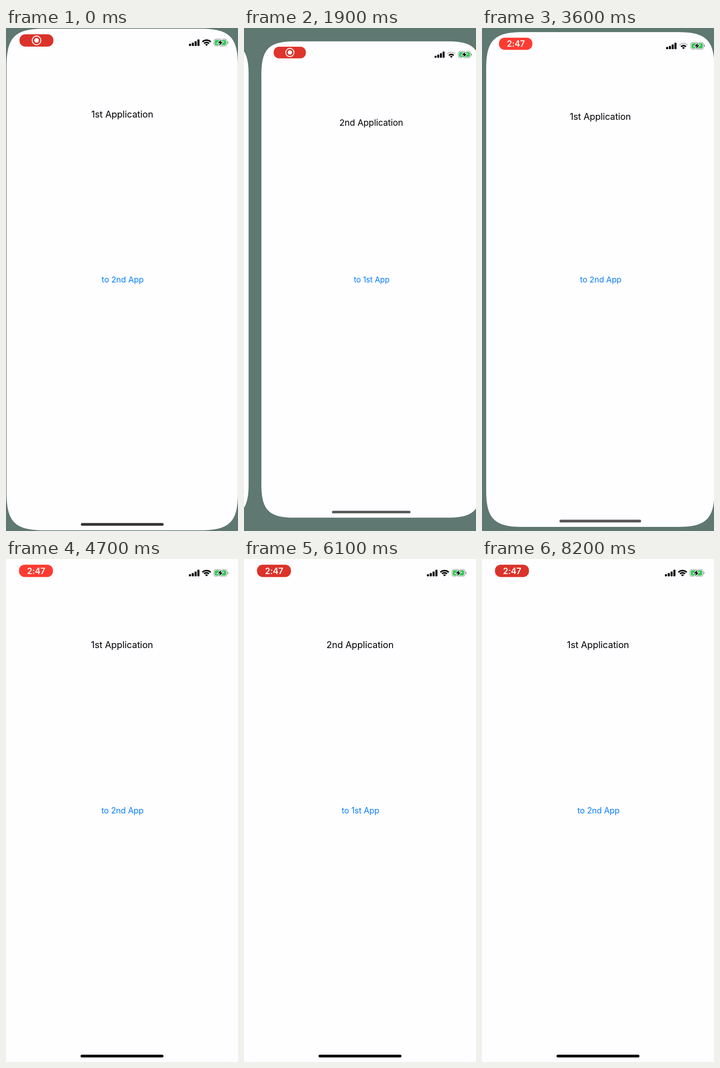
These frames come from a looping animation (509 by 1101 pixels, 8.3 s). An HTML page with a canvas:

```html
<!DOCTYPE html>
<html lang="en">
<head>
<meta charset="utf-8">
<title>Switching between two apps</title>
<style>
html, body { margin: 0; width: 100%; height: 100%; overflow: hidden; background: #5f7871; }
canvas { display: block; }
</style>
</head>
<body>
<canvas id="stage" width="509" height="1101"></canvas>
<script>
const W = 509, H = 1101, GAP = 29.6, LOOP = 8300, STEP = 100;
const ctx = document.getElementById('stage').getContext('2d');
const FONT = 'Inter, "Liberation Sans", sans-serif';
const APPS = [
  { title: '1st Application', link: 'to 2nd App' },
  { title: '2nd Application', link: 'to 1st App' }
];
// Start of each switch in ms; the apps alternate, and the first one is just ending at load.
const SWITCHES = [-650, 1563, 3128.7, 5152, 6633];
const PRESS_LEAD = 200;

// Slide of the incoming card (1 = next slot, 0 = in place) and shrink of the whole deck.
const slide = s => (1 + 14.2 * s) * Math.exp(-14.2 * s);
const shrink = s => 35.9 * s ** 1.84 * Math.exp(-13.4 * s);

function text(str, x, y, size, color, weight = 400) {
  ctx.font = `${weight} ${size}px ${FONT}`;
  ctx.letterSpacing = -0.006 * size + 'px';
  ctx.textAlign = 'center';
  ctx.fillStyle = color;
  ctx.fillText(str, x, y);
}

function box(x, y, w, h, r, color) {
  ctx.beginPath();
  ctx.roundRect(x, y, w, h, r);
  ctx.fillStyle = color;
  ctx.fill();
}

function circle(x, y, r) {
  ctx.beginPath();
  ctx.arc(x, y, r, 0, 2 * Math.PI);
}

// Card outline with smooth continuous corners.
function cardPath(x, y, w, h, r) {
  const k = r * 0.23, right = x + w, low = y + h;
  ctx.beginPath();
  ctx.moveTo(x, y + r);
  ctx.bezierCurveTo(x, y + k, x + k, y, x + r, y);
  ctx.lineTo(right - r, y);
  ctx.bezierCurveTo(right - k, y, right, y + k, right, y + r);
  ctx.lineTo(right, low - r);
  ctx.bezierCurveTo(right, low - k, right - k, low, right - r, low);
  ctx.lineTo(x + r, low);
  ctx.bezierCurveTo(x + k, low, x, low - k, x, low - r);
  ctx.closePath();
}

function backdrop() {
  ctx.fillStyle = '#5f7871';
  ctx.fillRect(0, 0, W, H);
  ctx.filter = 'blur(13px)';
  box(74, 572, 135, 138, 30, '#50393f');
  box(255, 530, 145, 158, 30, '#666467');
  box(255, 803, 145, 134, 30, '#626063');
  ctx.filter = 'none';
}

function pill(t) {
  const dim = 0.14 * Math.max(0, Math.cos(2 * Math.PI * t / 2050));
  const red = [255, 59, 50].map(c => Math.round(c * (1 - dim)));
  box(28.5, 12.4, 74.5, 27, 12.5, `rgb(${red})`);
  if (t >= 2400) {
    text('2:47', 66, 32.7, 18.5, '#fff', 600);
    return;
  }
  ctx.strokeStyle = ctx.fillStyle = '#fff';
  ctx.lineWidth = 2;
  circle(66, 25.7, 9.6);
  ctx.stroke();
  circle(66, 25.7, 5);
  ctx.fill();
}

function wifi(weak) {
  const arc = (r, width, color) => {
    ctx.beginPath();
    ctx.arc(440, 38, r, -0.75 * Math.PI, -0.25 * Math.PI);
    ctx.lineWidth = width;
    ctx.strokeStyle = color;
    ctx.stroke();
  };
  arc(12.7, 3.2, weak ? '#c9c8ca' : '#000');
  arc(7.8, 3.2, '#000');
  arc(2.2, 4.4, '#000');
}

function battery() {
  ctx.beginPath();
  ctx.roundRect(456.2, 23, 28.6, 15, 4.2);
  ctx.lineWidth = 1.1;
  ctx.strokeStyle = '#8f8f92';
  ctx.stroke();
  box(486, 28, 1.8, 5, 1, '#8f8f92');
  box(458, 24.8, 25, 11.4, 2.6, '#34c759');
  ctx.beginPath();
  [[472.5, 24], [464.5, 31.6], [469.3, 31.6], [467.8, 37.3], [475.8, 29.4], [471, 29.4]]
    .forEach(p => ctx.lineTo(...p));
  ctx.closePath();
  ctx.lineWidth = 2.6;
  ctx.strokeStyle = '#fefdff';
  ctx.stroke();
  ctx.fillStyle = '#000';
  ctx.fill();
}

function statusBar(t) {
  pill(t);
  [4.8, 7.2, 10.6, 14.4].forEach((h, i) => box(401.3 + i * 6.2, 38 - h, 4.5, h, 1.2, '#000'));
  wifi(t >= 1200 && t < 4500);
  battery();
}

function card(app, offset, z, t, active, pressed) {
  const s = 1 - z;
  ctx.save();
  ctx.translate(W / 2 + offset * (W + GAP) * s, H / 2);
  ctx.scale(s, s);
  ctx.translate(-W / 2, -H / 2);
  // Corners tighten a little as the deck shrinks.
  cardPath(0, 0, W, H, z ? 82 - 100 * z : 0);
  ctx.fillStyle = '#fefdff';
  ctx.fill();
  text(app.title, W / 2, 195.4, 20.2, '#000');
  text(app.link, W / 2 + 1, 557.3, 18, pressed ? 'rgba(0,122,255,.25)' : '#087ff8');
  const grey = Math.round(88 * (1 - Math.exp(-330 * z)));
  box(163.5, 1085, 182, 6, 3, `rgb(${grey},${grey},${grey})`);
  if (active) statusBar(t);
  ctx.restore();
}

function draw(t) {
  const i = SWITCHES.findLastIndex(start => start <= t);
  const s = (t - SWITCHES[i]) / 1000;
  const moving = shrink(s) > 0.001 || s < 0.1;
  const z = moving ? shrink(s) : 0;
  const d = moving ? slide(s) : 0;
  backdrop();
  if (moving) card(APPS[(i + 1) % 2], d - 1, z, t, false, true);
  card(APPS[i % 2], d, z, t, true, t > SWITCHES[i + 1] - PRESS_LEAD);
}

const begin = performance.now();
function tick() {
  const t = (performance.now() - begin) % LOOP;
  draw(Math.floor(t / STEP) * STEP);
  requestAnimationFrame(tick);
}
tick();
</script>
</body>
</html>
```
